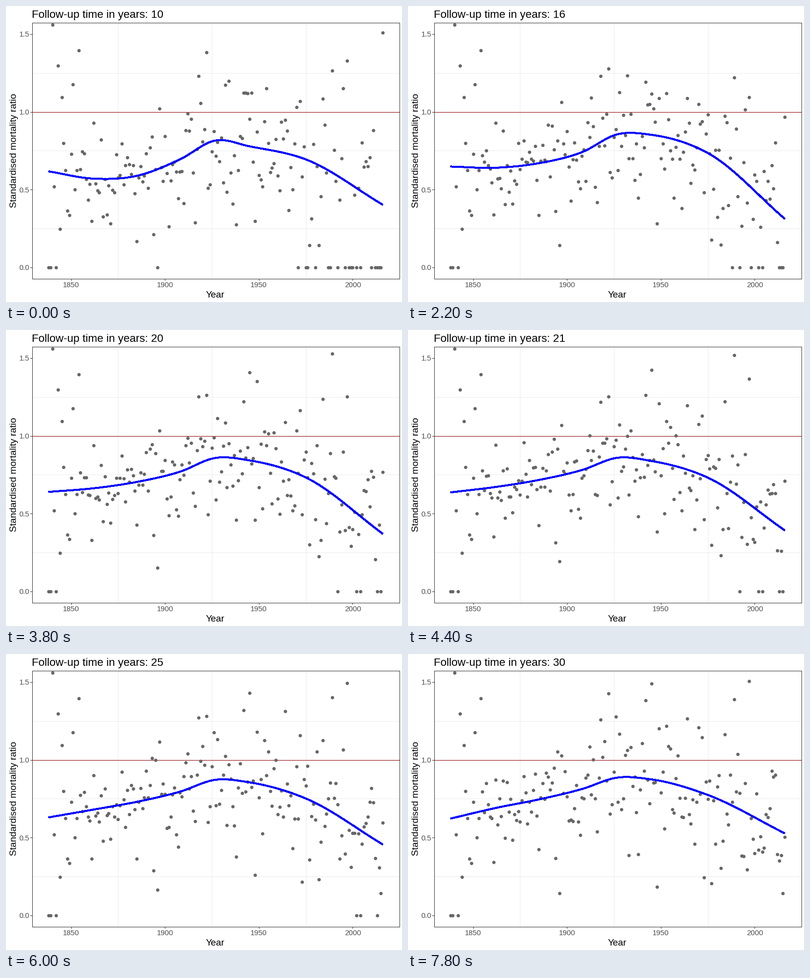
Write a matplotlib script that moves like this. It is 800 px wide and 600 px high and loops after 8 s.

```python
import numpy as np
import matplotlib.pyplot as plt
from matplotlib.animation import FuncAnimation
from matplotlib.patches import Rectangle

W, H, DPI = 800, 600, 100
FRAMES, STEP = 40, 200
T0, T1, T_MID = 10, 30, 21
FIRST, LAST = 1838, 2016
LEFT, RIGHT, TOP, BOTTOM = 52.5, 794.5, 33.5, 552.5

plt.rcParams["font.family"] = "Liberation Sans"

# Settled ratios of the first cohorts, and a few that stand out later
EARLY = [0, 0, 1.56, .52, 0, 1.297, .245, 1.094, .80, .623, .362, .334,
         .73, 1.175, .50, .623, 1.396]
NOTABLE = {1861: .35, 1862: .95, 1894: .31, 1896: .2, 1918: 1.23, 1922: 1.26,
           1942: 1.24, 1945: 1.41, 1948: .39, 1972: 1.15, 1977: .28,
           1984: 1.23, 1989: 1.52, 1997: 1.36}

# Cohorts that leave zero at a given follow-up time
FIRST_DEATH = {11: [1896, 1971, 1975, 1976, 2000],
               14: [1980, 1987, 1996, 1999, 2010, 2012],
               19: [1988, 1998, 2014],
               23: [1992, 2015],
               27: [2002, 2004, 2013]}

# Smoothed curve: heights at the knots for a few follow-up times
KNOTS = np.array([1838, 1862, 1885, 1908, 1927, 1945, 1975, 2016.])
CURVES = {
    10: [.617, .570, .588, .694, .816, .778, .694, .402],
    13: [.626, .612, .638, .709, .808, .799, .697, .275],
    15.6: [.648, .640, .669, .740, .856, .852, .735, .311],
    21.3: [.636, .671, .716, .780, .859, .838, .731, .392],
    30: [.622, .690, .745, .812, .886, .874, .774, .527],
}


def follow_up(frame):
    return T0 + (T1 - T0) * frame / (FRAMES - 1)


def px(year):
    return 131.5 + 3.793 * (np.asarray(year) - 1850)


def py(ratio):
    return 529.5 - 315 * np.asarray(ratio)


def hermite(x, knots, vals):
    slope = np.gradient(vals, knots)
    k = np.clip(np.searchsorted(knots, x, side="right") - 1, 0, len(knots) - 2)
    h = knots[k + 1] - knots[k]
    u = (x - knots[k]) / h
    return ((1 + 2 * u) * (1 - u) ** 2 * vals[k]
            + u * (1 - u) ** 2 * h * slope[k]
            + u * u * (3 - 2 * u) * vals[k + 1]
            + u * u * (u - 1) * h * slope[k + 1])


def trend(t, years):
    rows = zip(*CURVES.values())
    vals = np.array([np.interp(t, list(CURVES), row) for row in rows])
    return hermite(years, KNOTS, vals)


YEARS = np.arange(FIRST, LAST + 1)
TIMES = np.arange(T0, T1 + 1)


def build_states():
    """Ratios of all years at every whole follow-up time."""
    rng = np.random.default_rng(12)
    age = np.clip((YEARS - 1854) / 130, 0, 1)
    moving = YEARS > 1854
    mid = trend(T_MID, YEARS)
    noise = np.clip(rng.normal(0, 1, len(YEARS)), -2, 2)
    level = mid + noise * (.12 + .1 * age)
    level[:len(EARLY)] = EARLY
    for year, ratio in NOTABLE.items():
        level[year - FIRST] = ratio

    # Later cohorts wander more, forwards and backwards from the middle
    steps = rng.normal(0, 1, (len(TIMES), len(YEARS)))
    steps *= moving * (.015 + .04 * age)
    m = T_MID - T0
    walk = np.zeros_like(steps)
    walk[m + 1:] = np.cumsum(steps[m + 1:], axis=0)
    walk[:m] = 1.4 * np.cumsum(steps[:m][::-1], axis=0)[::-1]

    drift = np.array([trend(t, YEARS) - mid for t in TIMES]) * moving
    states = level + walk + drift
    states[:, moving] = np.maximum(states[:, moving], .14)
    for t, years in FIRST_DEATH.items():
        for year in years:
            states[TIMES < t, year - FIRST] = 0
    # A single early death is diluted as time goes on
    states[:, -1] = 15.1 / TIMES
    return states


STATES = build_states()


def ratios(t):
    k = min(int(t - T0), len(TIMES) - 2)
    u = t - T0 - k
    return (1 - u) * STATES[k] + u * STATES[k + 1]


fig = plt.figure(figsize=(W / DPI, H / DPI), dpi=DPI, facecolor="white")
ax = fig.add_axes([0, 0, 1, 1])
ax.set_xlim(0, W)
ax.set_ylim(H, 0)
ax.axis("off")


def line(xs, ys, color, z, width=1):
    return ax.plot(xs, ys, color=color, lw=width * .72, zorder=z,
                   antialiased=False, solid_capstyle="butt")[0]


def label(x, y, s, size, color="black", **kw):
    return ax.text(x, y, s, fontsize=size * .72, color=color, **kw)


for year in (1875, 1925, 1975):
    line([px(year)] * 2, [TOP, BOTTOM], "#ebebeb", 1)
for ratio in (.25, .75, 1.25):
    line([LEFT, RIGHT], [py(ratio)] * 2, "#ebebeb", 1)
line([LEFT, RIGHT], [py(1)] * 2, "#8b0000", 2)

for year in range(1850, 2001, 50):
    line([px(year)] * 2, [BOTTOM, BOTTOM + 3.5], "#333333", 5)
    label(px(year), 570, str(year), 14.93, "#4d4d4d", ha="center")
for ratio in (0, .5, 1, 1.5):
    line([LEFT - 3.5, LEFT], [py(ratio)] * 2, "#333333", 5)
    label(47.5, py(ratio) + 5.5, f"{ratio:.1f}", 14.93, "#4d4d4d", ha="right")

label(423, 591, "Year", 18.8, ha="center")
label(21, 293, "Standardised mortality ratio", 19.1, rotation=90,
      rotation_mode="anchor", ha="center")
title = label(51.5, 24, "", 22.3)

panel = Rectangle((LEFT, TOP), RIGHT - LEFT, BOTTOM - TOP, fill=False,
                  ec="#333333", lw=.72, zorder=6, antialiased=False)
ax.add_patch(panel)

dots, = ax.plot([], [], "o", color="#666666", ms=6.8 * .72, mew=0, zorder=3,
                antialiased=False)
dots.set_clip_path(panel)
curve = line([], [], "#0000ff", 4, 3)
CURVE_X = np.linspace(FIRST, LAST, 80)


def draw(frame):
    t = follow_up(frame)
    title.set_text(f"Follow-up time in years: {round(t)}")
    dots.set_data(px(YEARS), py(ratios(t)))
    curve.set_data(px(CURVE_X), py(trend(t, CURVE_X)))
    return title, dots, curve


anim = FuncAnimation(fig, draw, frames=FRAMES, interval=STEP,
                     repeat=True, repeat_delay=0)
plt.show()
```
